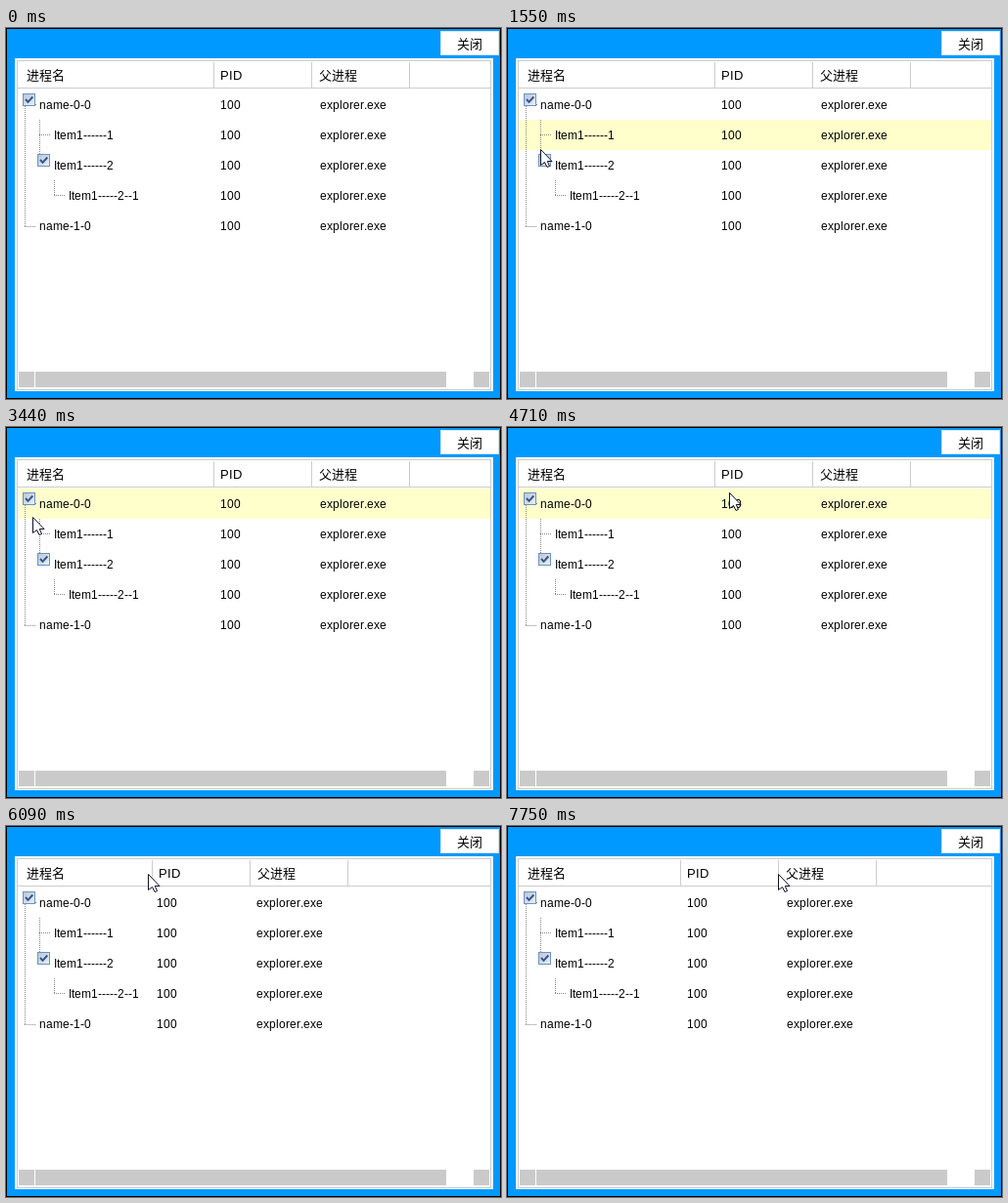
An HTML page with a canvas for the animation above (8000 ms loop, 506 px wide and 380 px high).

```html
<!DOCTYPE html>
<html lang="zh">
<head>
<meta charset="utf-8">
<title>进程</title>
<style>
html, body { margin: 0; width: 100%; height: 100%; overflow: hidden; background: #09f; }
canvas { display: block; }
</style>
</head>
<body>
<canvas id="stage" width="506" height="380"></canvas>
<script>
const ctx = document.getElementById('stage').getContext('2d');
const LOOP = 8000, ROW = 31, TOP = 63;
const LATIN = '"Liberation Sans", Arial, sans-serif';
const CJK = '"Noto Sans CJK SC", "Noto Sans CJK", sans-serif';

// time, x, y; x is relative to the column drag
const POINTER = [
  [560, 395, -9], [800, 300, 60], [1010, 170, 145], [1190, 60, 130],
  [1370, 30, 85], [1550, 34, 124], [1700, 37, 132], [3140, 37, 132],
  [3440, 27, 92], [3620, 23, 74], [4530, 23, 74], [4710, 227, 67],
  [4860, 240, 60], [5130, 210, 48], [5700, 210, 47], [6540, 210, 51],
  [6900, 210, 50], [7140, 314, 51], [7260, 314, 51], [7380, 225, 44],
  [7690, 225, 44], [7750, 312, 49]
];
const DRAG = [
  [5310, 0], [5400, 2], [5670, -35], [5700, -38], [6120, -67], [6250, -79],
  [6510, -54], [6540, -51], [6720, -36], [6750, -35]
];
const ARROW = [[0, 0], [0, 16], [4, 13], [6.5, 18], [9, 17], [6.8, 12], [11.5, 12]];

function sample(keys, t, i) {
  if (t <= keys[0][0]) return keys[0][i];
  for (let k = 1; k < keys.length; k++) {
    const a = keys[k - 1], b = keys[k];
    if (t <= b[0]) return Math.round(a[i] + (b[i] - a[i]) * (t - a[0]) / (b[0] - a[0]));
  }
  return keys[keys.length - 1][i];
}

function rect(x, y, w, h, color) {
  ctx.fillStyle = color;
  ctx.fillRect(x, y, w, h);
}

function frame(x, y, w, h, color) {
  ctx.strokeStyle = color;
  ctx.lineWidth = 1;
  ctx.strokeRect(x + .5, y + .5, w - 1, h - 1);
}

// Glyphs advance by whole pixels
function text(str, x, y, size = 12, family = LATIN) {
  ctx.font = size + 'px ' + family;
  ctx.fillStyle = '#000';
  for (const ch of str) {
    ctx.fillText(ch, x, y);
    x += Math.round(ctx.measureText(ch).width);
  }
}

function dots(x, y, w, h) {
  for (let i = 0; i < Math.max(w, h); i += 2)
    rect(w > h ? x + i : x, w > h ? y : y + i, 1, 1, '#888');
}

function branch(x, top, y) {
  dots(x, top, 1, y - top);
  dots(x, y, 12, 1);
}

function checkbox(x, y, on, pressed) {
  const g = ctx.createLinearGradient(x, y, x + 13, y + 13);
  g.addColorStop(0, pressed ? '#9fb4cc' : '#b6c2d0');
  g.addColorStop(1, pressed ? '#d0deec' : '#eef2f6');
  rect(x, y, 13, 13, g);
  frame(x, y, 13, 13, '#6a93c4');
  if (!on) return;
  ctx.strokeStyle = '#33558f';
  ctx.lineWidth = 2;
  ctx.beginPath();
  ctx.moveTo(x + 3, y + 6);
  ctx.lineTo(x + 5.5, y + 8.8);
  ctx.lineTo(x + 10.3, y + 3.5);
  ctx.stroke();
}

function arrow(x, y) {
  ctx.beginPath();
  for (const [px, py] of ARROW) ctx.lineTo(x + px + .5, y + py + .5);
  ctx.closePath();
  ctx.fillStyle = '#fff';
  ctx.fill();
  ctx.strokeStyle = '#101028';
  ctx.lineWidth = 1;
  ctx.stroke();
}

function shell() {
  rect(0, 0, 506, 380, '#09f');
  rect(444, 3, 60, 25, '#fff');
  frame(444, 3, 60, 25, '#d8e4ee');
  text('关闭', 461, 21, 13, CJK);
  rect(9, 31, 489, 341, '#fff');
  frame(11, 33, 485, 338, '#ccc');
}

function header(shift) {
  rect(12, 61, 483, 1, '#ccc');
  for (let i = 0; i < 3; i++) rect(212 + i * 100 + shift, 35, 1, 26, '#ccc');
  text('进程名', 21, 53, 13, CJK);
  text('PID', 219 + shift, 53, 13);
  text('父进程', 320 + shift, 53, 13, CJK);
}

function scrollbar(end) {
  rect(13, 352, 16, 16, '#cacaca');
  rect(30, 352, end - 30, 16, '#cacaca');
  rect(478, 352, 16, 16, '#cacaca');
}

function tree(open, subOpen, rootDown, subDown, shift) {
  const rows = [['name-0-0', 34]];
  if (open) {
    rows.push(['Item1------1', 49], ['Item1------2', 49]);
    if (subOpen) rows.push(['Item1-----2--1', 64]);
  }
  rows.push(['name-1-0', 34]);

  branch(19, 80, 79 + ROW * (rows.length - 1));
  dots(20, 78, 12, 1);
  if (open) {
    branch(34, 94, 109);
    branch(34, 110, 140);
    if (subOpen) branch(49, 156, 171);
    checkbox(32, 129, subOpen, subDown);
  }
  checkbox(17, 67, open, rootDown);

  rows.forEach(([name, x], i) => {
    const y = 83 + i * ROW;
    if (x === 64 && shift < -74) {
      text(name.slice(0, -1), x, y - 7);
      text(name.slice(-1), x, y + 7);
    } else {
      text(name, x, y);
    }
    text('100', 219 + shift, y);
    text('explorer.exe', 321 + shift, y);
  });
}

function draw(now) {
  const within = (a, b) => now >= a && now < b;
  const offset = now < 4000 ? 20 : now < 7600 ? 0 : 10;
  const t = Math.floor((now - offset) / 30) * 30 + offset;
  const shift = sample(DRAG, t, 1);
  const headShift = t < 6930 ? sample(DRAG, Math.min(t, 6750) - 30, 1) : shift;
  const x = sample(POINTER, t, 1) + shift, y = sample(POINTER, t, 2);
  const open = !within(3920, 4410), subOpen = !within(2000, 3020);
  const count = open ? (subOpen ? 5 : 4) : 2;
  const hover = Math.floor((y - TOP) / ROW);

  shell();
  if (hover >= 0 && hover < count) rect(13, TOP + hover * ROW, 482, ROW, '#ffc');
  header(headShift);
  tree(open, subOpen, within(3830, 3920) || within(4350, 4410),
    within(1910, 2000) || within(2930, 3020), shift);
  if (open) scrollbar(subOpen ? 450 : 463);
  if (now >= 100) arrow(x, y);
  frame(0, 0, 506, 380, '#000');
}

const start = performance.now();
function tick() {
  draw((performance.now() - start) % LOOP);
  requestAnimationFrame(tick);
}
tick();
</script>
</body>
</html>
```
